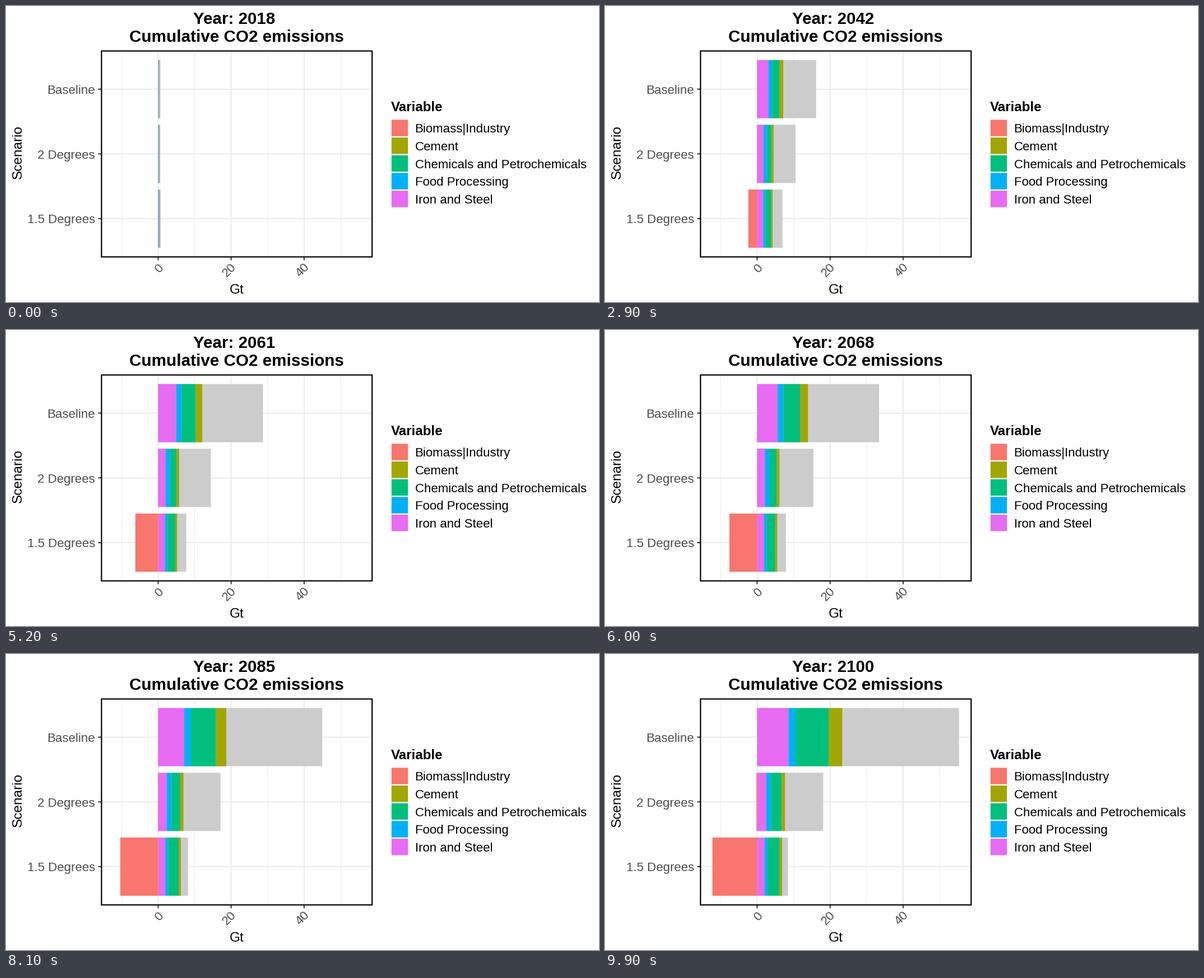
Recreate the animation shown at these times as a matplotlib script. Size 1058x529 px, loop 10000 ms.

```python
import numpy as np
import matplotlib.pyplot as plt
from matplotlib.animation import FuncAnimation
from matplotlib.patches import Rectangle

W, H, DPI = 1058, 529, 64
PT = 72 / DPI
FRAMES, YEARS = 100, 82
ZERO, UNIT = 271.4, 6.512
LEFT, RIGHT, TOP, BOTTOM = 170.4, 653.2, 80.4, 448.4
BAR_H, ROW_GAP = 104, 115.7

SALMON, OLIVE, GREEN = "#F8766D", "#A3A500", "#00BF7D"
BLUE, PINK, GREY = "#00B0F6", "#E76BF3", "#CCCCCC"

plt.rcParams["font.family"] = "Liberation Sans"
fig = plt.figure(figsize=(W / DPI, H / DPI), dpi=DPI, facecolor="white")
ax = fig.add_axes([0, 0, 1, 1])
ax.set_xlim(0, W)
ax.set_ylim(H, 0)
ax.axis("off")


def rect(x, y, w, h, color, z=2):
    return ax.add_patch(Rectangle((x, y), w, h, fc=color, lw=0, zorder=z,
                                  snap=False))


def line(x0, y0, x1, y1, color, width):
    ax.plot([x0, x1], [y0, y1], color=color, lw=width * PT, zorder=1,
            solid_capstyle="butt", snap=False)


def text(x, y, s, size, color="black", **kw):
    kw.setdefault("va", "baseline")
    return ax.text(x, y, s, fontsize=size * PT, color=color, **kw)


# Scenario: power of the lasting part, then for steel, food, chemicals, cement
# and total the final edge in pixels, lasting share and decay time.
SCENARIOS = {
    "Baseline": (2, [(56.1, .38, .5), (68.6, .3, .5), (128.1, .487, .5),
                     (151.8, .5, .5), (360.2, .13, 5)]),
    "2 Degrees": (1, [(16.2, .35, .12), (25, .2, .17), (43.8, .5, .14),
                      (49.7, .5, .14), (117.9, .1, .35)]),
    "1.5 Degrees": (1, [(13.3, .18, .11), (18.8, .2, .11), (40.2, .5, .11),
                        (44.6, .5, .11), (55.2, .18, .11)]),
}
PARTS = [PINK, BLUE, GREEN, OLIVE, GREY]
# Biomass: first year and final width
BIOMASS = {"2 Degrees": (57, 1.3), "1.5 Degrees": (4, 79.8)}


def emitted(year, power, end, share, decay):
    """Cumulative sum of a fading flow and a lasting one."""
    u = (year + 1) / (YEARS + 1)
    fading = (1 - np.exp(-u / decay)) / (1 - np.exp(-1 / decay))
    return end * ((1 - share) * fading + share * u ** power)


def removed(year, start, end):
    """Uptake that builds up from the start year and then slows."""
    def total(y):
        s = max(0, y - start) / 30
        return 1 - (1 + s) * np.exp(-s)
    return end * total(year) / total(YEARS)


# Panel
for v in range(-10, 51, 10):
    x = ZERO + v * UNIT
    major = v % 20 == 0
    line(x, TOP, x, BOTTOM, "#EBEBEB", 2 if major else 1)
    if major:
        line(x, BOTTOM, x, BOTTOM + 6, "#333333", 2)
        text(x + (2.1 if v == 0 else -2.7), 470 if v == 0 else 472, str(v),
             22.3, "#4D4D4D", rotation=45, ha="center", va="center")
ax.add_patch(Rectangle((LEFT, TOP), RIGHT - LEFT, BOTTOM - TOP, fill=False,
                       ec="black", lw=2.2 * PT, zorder=5, snap=False))
text(411.5, 514.5, "Gt", 24.4, ha="center")
text(28, 261, "Scenario", 24.4, rotation=90, rotation_mode="anchor",
     ha="center")

# Scenario rows
bars, uptakes = [], []
for i, (name, (power, parts)) in enumerate(SCENARIOS.items()):
    y = 148.6 + ROW_GAP * i
    line(LEFT, y, RIGHT, y, "#EBEBEB", 2)
    line(LEFT - 6, y, LEFT, y, "#333333", 2)
    text(158.8, y + 8.2, name, 22.3, "#4D4D4D", ha="right")
    top = y - BAR_H / 2
    row = [rect(ZERO, top, 0, BAR_H, c, 2 if c == GREY else 3) for c in PARTS]
    bars.append((row, power, parts))
    if name in BIOMASS:
        uptakes.append((rect(ZERO, top, 0, BAR_H, SALMON, 3), BIOMASS[name]))

# Legend
text(687, 187.5, "Variable", 24.1, weight="bold")
LEGEND = {"Biomass|Industry": SALMON, "Cement": OLIVE,
          "Chemicals and Petrochemicals": GREEN,
          "Food Processing": BLUE, "Iron and Steel": PINK}
for i, (name, color) in enumerate(LEGEND.items()):
    y = 218 + 31.7 * i
    rect(687.8, y - 14.7, 29.4, 29.4, color)
    text(729.5, y + 8.2, name, 22.22)

text(411.5, 64, "Cumulative CO2 emissions", 29.6, weight="bold", ha="center")
title = text(407.5, 32.3, "", 29.5, weight="bold", ha="center")

# Every year lands on a whole frame; spare frames fall between two years.
STOPS = np.round(np.arange(YEARS + 1) * (FRAMES - 1) / YEARS)


def draw(i):
    year = np.interp(i, STOPS, np.arange(YEARS + 1))
    title.set_text(f"Year: {2018 + round(YEARS * i / (FRAMES - 1))}")
    for row, power, parts in bars:
        left = 0
        for bar, part in zip(row, parts):
            edge = emitted(year, power, *part)
            start = 0 if bar is row[-1] else left
            bar.set_x(ZERO + start)
            bar.set_width(edge - start)
            left = edge
    for bar, shape in uptakes:
        bar.set_width(-removed(year, *shape))
    return [title]


anim = FuncAnimation(fig, draw, frames=FRAMES, interval=100, repeat=True,
                     repeat_delay=0, init_func=lambda: draw(0))
plt.show()
```
